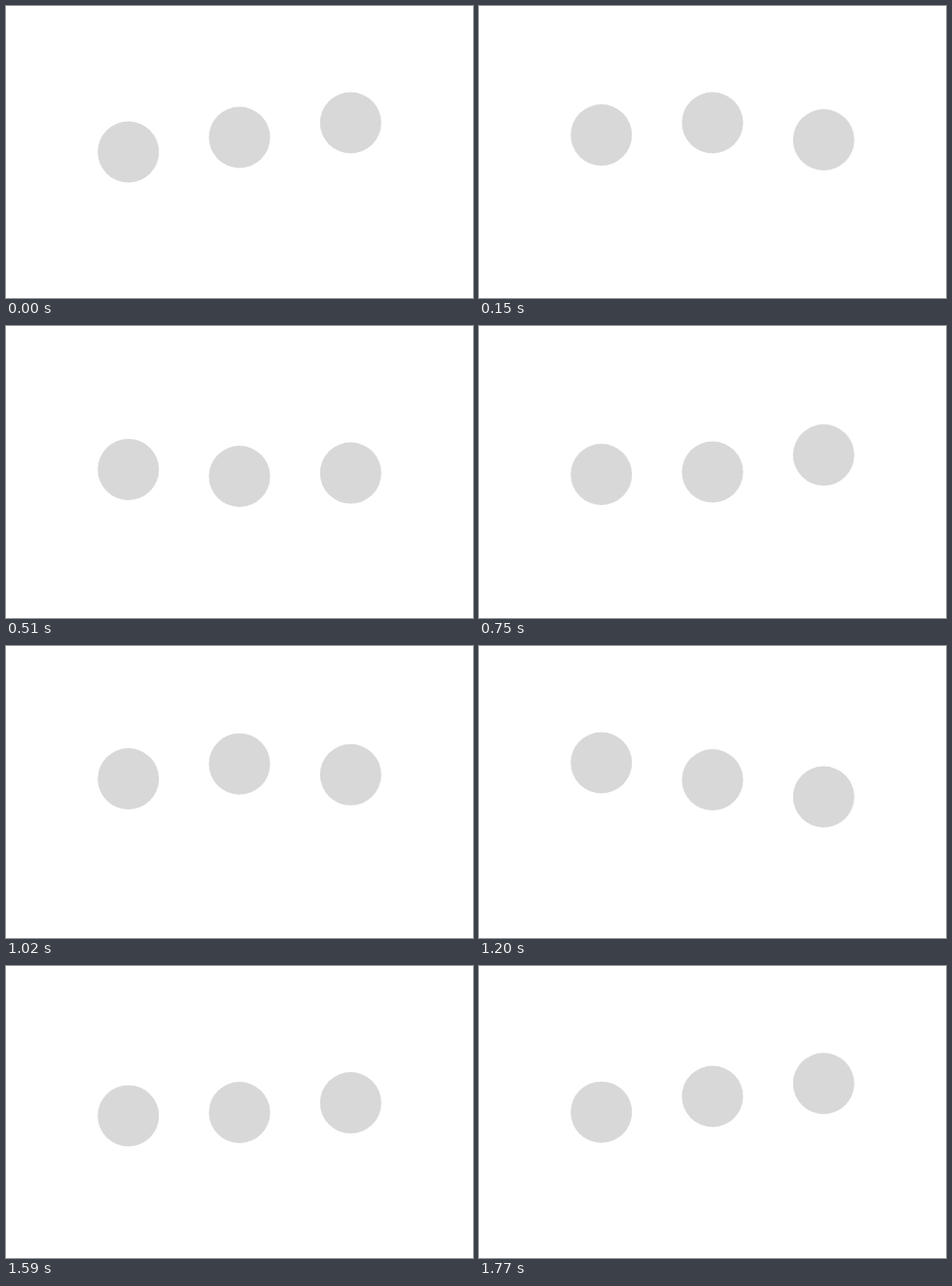
These frames come from a looping animation (480 by 300 pixels, 1.8 s). An HTML page:

```html
<!DOCTYPE html>
<html lang="en">
<head>
<meta charset="utf-8">
<title>Bouncing dots</title>
<style>
  html, body { margin: 0; width: 100%; height: 100%; overflow: hidden; background: #fff; }
  svg { display: block; width: 480px; height: 300px; }
</style>
</head>
<body>
<svg viewBox="0 0 480 300" fill="#d8d8d8">
  <circle cx="125.75" cy="150" r="31.5"/>
  <circle cx="240" cy="135" r="31.5"/>
  <circle cx="354.25" cy="120" r="31.5"/>
</svg>
<script>
const STEP = 30;    // ms per pose
const CYCLE = 30;   // poses per bounce
const dots = document.querySelectorAll('circle');

// Cubic Bezier easing, solved by bisection.
function bezier(x1, y1, x2, y2) {
  const at = (a, b, s) => 3 * a * s * (1 - s) ** 2 + 3 * b * s * s * (1 - s) + s ** 3;
  return x => {
    let lo = 0, hi = 1;
    for (let i = 0; i < 24; i++) {
      const mid = (lo + hi) / 2;
      if (at(x1, x2, mid) < x) lo = mid; else hi = mid;
    }
    return at(y1, y2, lo);
  };
}

const smooth = bezier(1 / 3, 0, 2 / 3, 1);
const lift = bezier(1 / 6, 0, 2 / 3, 1);
const settle = bezier(1 / 6, 1 / 6, 2 / 3, 1);

// Each key: pose, height, easing towards the next key.
const tracks = [
  [[0, 150, lift], [10, 120, smooth], [20, 155, smooth], [30, 150]],
  [[0, 135, settle], [5, 120, smooth], [15, 155, smooth], [25, 150, lift], [30, 132.4]],
  [[0, 120, smooth], [10, 155, smooth], [20, 150, lift], [30, 120]]
];

function height(keys, pose) {
  const i = keys.findIndex(key => key[0] > pose);
  const [start, from, ease] = keys[i - 1];
  const [end, to] = keys[i];
  return from + (to - from) * ease((pose - start) / (end - start));
}

let origin;
function draw(now) {
  origin ??= now;
  const pose = Math.floor((now - origin) / STEP) % CYCLE;
  dots.forEach((dot, i) => dot.setAttribute('cy', height(tracks[i], pose).toFixed(2)));
  requestAnimationFrame(draw);
}
requestAnimationFrame(draw);
</script>
</body>
</html>
```
